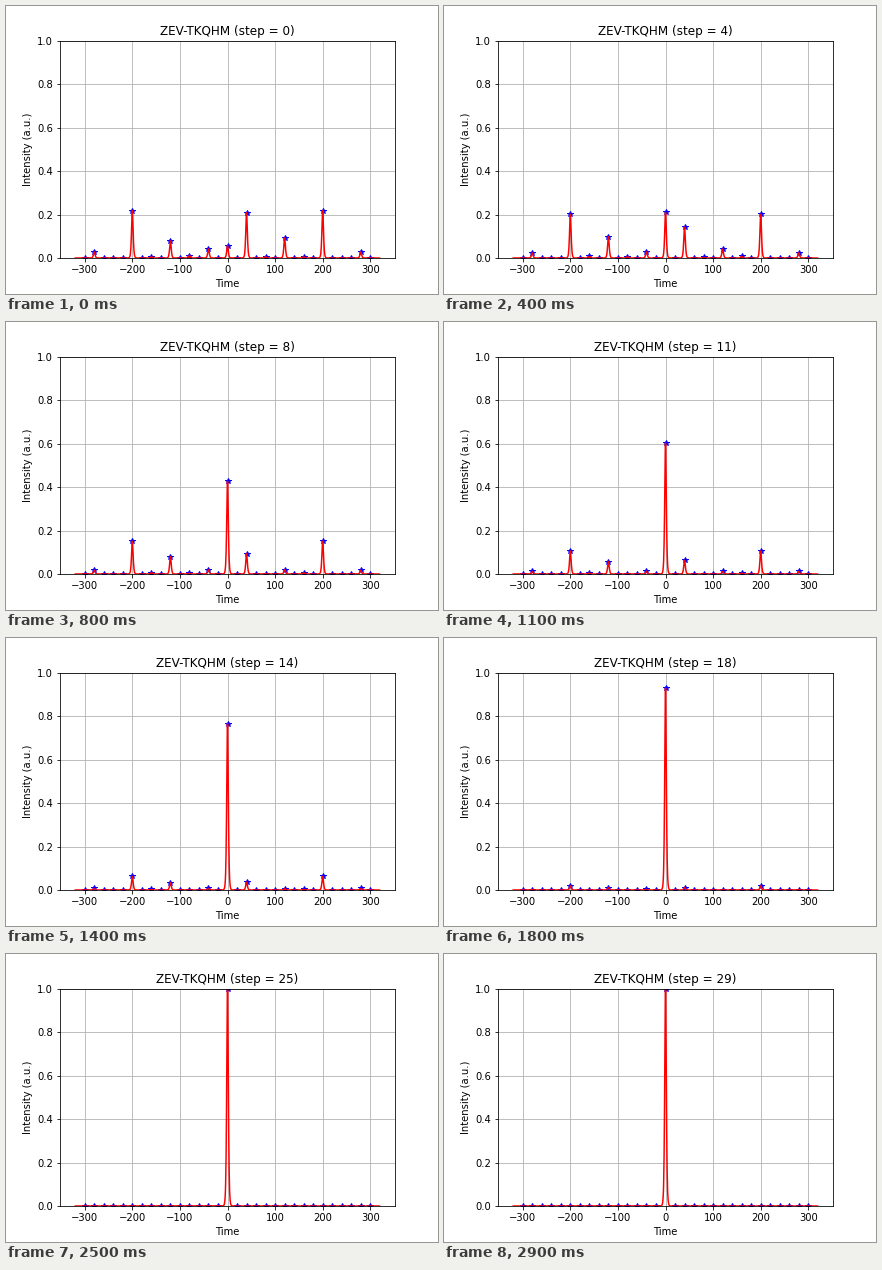
Recreate the animation shown at these times as a matplotlib script. Size 432 by 288 pixels, loop 3000 ms.

```python
import numpy as np
import matplotlib.pyplot as plt
from matplotlib.animation import FuncAnimation

plt.rcParams.update({"font.family": "DejaVu Sans", "font.size": 10})

STEPS = 30
PULSE_WIDTH = 2.2
TITLE = "ZEV-TKQHM (step = {})"

# Share of the energy outside the main pulse: at the start, once settled.
SHARES = {
    -280: (.030, .030), -200: (.231, .268), -160: (.006, .012),
    -120: (.083, .148), -80: (.012, .005), -40: (.044, .032),
    40: (.221, .155), 80: (.006, .002), 120: (.098, .025),
    160: (.006, .012), 200: (.231, .268), 280: (.030, .030),
}

slots = np.arange(-300, 301, 20)
early, late = np.array([SHARES.get(s, (0, 0)) for s in slots]).T
time = np.arange(-320, 320, .5)
pulses = 1 / np.cosh(np.clip((time[:, None] - slots) / PULSE_WIDTH, -50, 50)) ** 2


def heights(step):
    """The phase error falls steadily, moving all energy to the main pulse."""
    error = max(0, 1.33 - .0588 * step)
    share = late + (early - late) * np.exp(-step / 4)
    return np.where(slots == 0, np.cos(error) ** 2, share * np.sin(error) ** 2)


fig, ax = plt.subplots(figsize=(6, 4), dpi=72)
fig.subplots_adjust(left=.125, right=.9, bottom=.125, top=.88)
stars, = ax.plot(slots, heights(0), "b*")
trace, = ax.plot(time, pulses @ heights(0), "r")
ax.set(ylim=(0, 1), xlabel="Time", ylabel="Intensity (a.u.)")
ax.grid()
title = ax.set_title(TITLE.format(0))


def update(step):
    peaks = heights(step)
    stars.set_ydata(peaks)
    trace.set_ydata(pulses @ peaks)
    title.set_text(TITLE.format(step))
    return stars, trace, title


anim = FuncAnimation(fig, update, frames=STEPS, interval=100, repeat=True)
plt.show()
```
